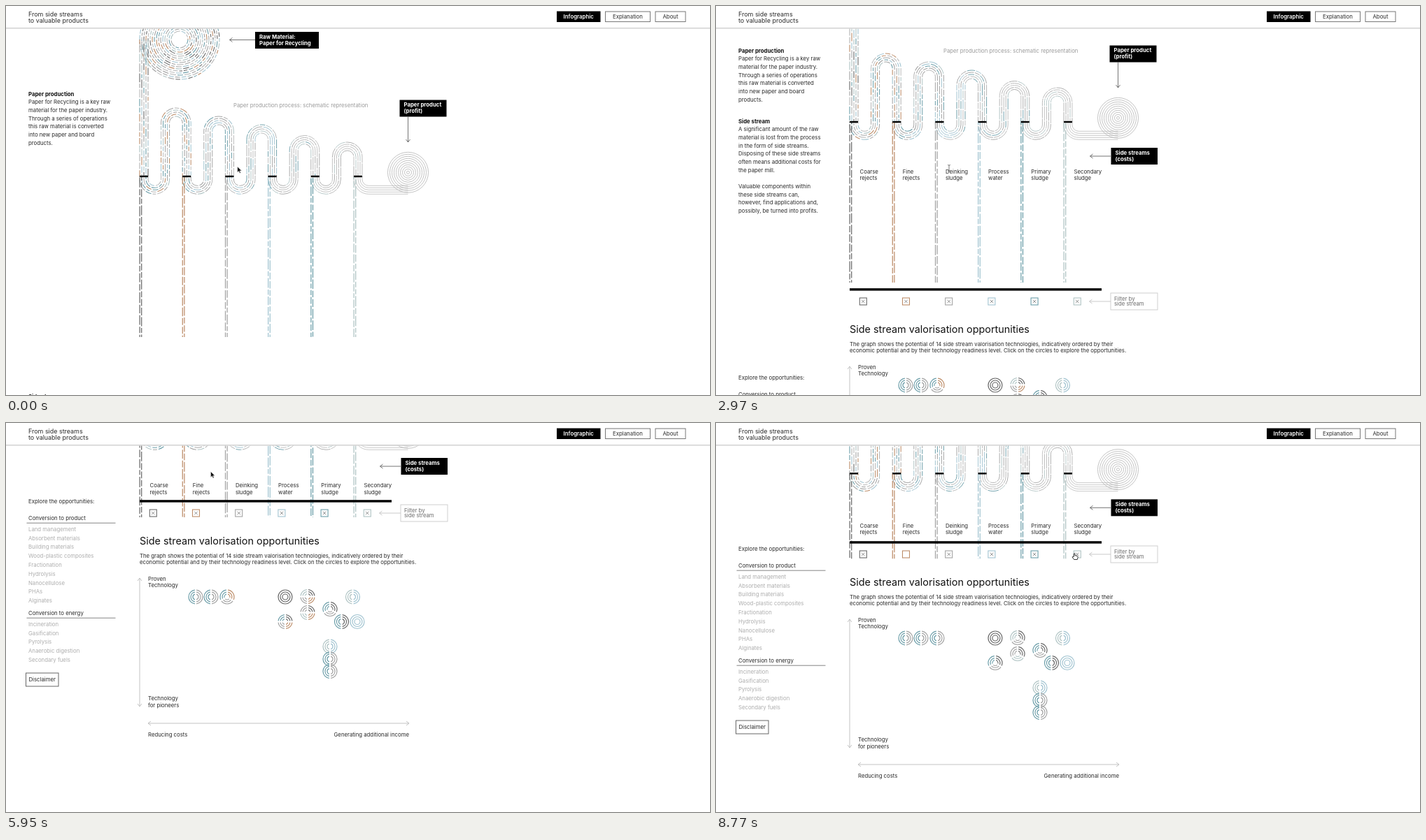
Recreate the animation shown at these times as an HTML page. Size 1006 px wide and 557 px high, loop 8870 ms.

```html
<!DOCTYPE html>
<html lang="en">
<head>
<meta charset="utf-8">
<title>Side streams</title>
<style>
  html, body { margin: 0; width: 100%; height: 100%; overflow: hidden; background: #fff; }
  svg { display: block; width: 100vw; height: 100vh; }
  text { font-family: Inter, Roboto, sans-serif; white-space: pre; }
</style>
</head>
<body>
<svg id="stage" viewBox="0 0 1006 557"></svg>
<script>
const LOOP = 8870, STEP = 148.64;
const STREAMS = ['#6a6a6a', '#bd8d69', '#a3a3a3', '#a2c4d1', '#6c9ea9', '#b0c4c4'];
const NAMES = ['Coarse rejects', 'Fine rejects', 'Deinking sludge', 'Process water', 'Primary sludge', 'Secondary sludge'];
const GAP = 61.2, FIRST = 197, BAR = 244;
const stage = document.getElementById('stage');

let seed = 7;
const rnd = () => (seed = seed * 16807 % 2147483647) / 2147483647;
const pick = list => list[Math.floor(rnd() * list.length)];

function add(parent, tag, attrs = {}) {
  const el = document.createElementNS('http://www.w3.org/2000/svg', tag);
  for (const k in attrs) el.setAttribute(k, attrs[k]);
  parent.appendChild(el);
  return el;
}
const group = (parent, attrs) => add(parent, 'g', attrs);
const rect = (parent, x, y, width, height, fill, more) => add(parent, 'rect', { x, y, width, height, fill, ...more });
const stroke = (parent, d, color, width = 1, more) =>
  add(parent, 'path', { d, fill: 'none', stroke: color, 'stroke-width': width, ...more });

// y is the middle of the capitals
function text(parent, x, y, str, more = {}) {
  const size = more['font-size'] || 7.78;
  add(parent, 'text', { x, y: y + size * 0.36, 'font-size': size, fill: '#2a2a2a', ...more }).textContent = str;
}
function lines(parent, x, y, lead, list, more) {
  list.forEach((s, i) => text(parent, x, y + i * lead, s, more));
}
const BOLD = { 'font-weight': 700, fill: '#111' };
const PALE = { fill: '#adadad' };

// A line of mixed dashes: one path per colour, all sharing the same period
const threads = [];
function dashed(parent, d, pool, len, gap, width) {
  const g = group(parent);
  const dashes = Array.from({ length: 16 }, () => ({ len: len * (0.6 + rnd() * 0.8), color: pick(pool) }));
  for (const c of new Set(dashes.map(o => o.color))) {
    const arr = [0];
    let run = 0;
    for (const o of dashes) {
      if (o.color === c) { arr.push(run.toFixed(3), o.len.toFixed(3)); run = gap; }
      else run += o.len + gap;
    }
    arr.push(run.toFixed(3));
    stroke(g, d, c, width, { 'stroke-dasharray': arr.join(' ') });
  }
  threads.push({ g, phase: rnd() * 100 });
}

function tag(parent, x, y, w, list) {
  rect(parent, x, y, w, 24, '#000');
  lines(parent, x + 6, y + 7, 9, list, { ...BOLD, fill: '#fff' });
}

// ---- production scheme ----
const scheme = group(stage);
const OFFSETS = [-6, -3, 0, 3, 6];
const TOPS = [146, 158, 170, 185.5, 195];
const GREYS = ['#a6a6a6', '#b4b4b4', '#bdbdbd'];

for (let r = 12; r <= 57; r += 3) {
  dashed(scheme, `M${248 + r} 48a${r} ${r} 0 0 1 ${-2 * r} 0a${r} ${r} 0 0 1 ${2 * r} 0`,
    [...STREAMS, ...GREYS], 7, 2, 1.1);
}
for (const d of OFFSETS) {
  dashed(scheme, `M${FIRST + d} 48V${BAR}`, [...STREAMS, ...GREYS], 9, 2, 1.1);
  TOPS.forEach((top, i) => {
    const x = FIRST + i * GAP, r = 15.3 - d, R = 15.3 + d;
    const path = `M${x + d} ${BAR}V248a${r} ${r} 0 0 0 ${2 * r} 0V${top + 21.3}a${R} ${R} 0 0 1 ${2 * R} 0V${BAR}`;
    dashed(scheme, path, [...STREAMS.slice(i + 1), ...GREYS, ...(i > 2 ? GREYS : [])], 8 + i * 2, 2 - i * 0.25, 1.05 - i * 0.04);
  });
  const x = FIRST + 5 * GAP, r = 15.3 - d;
  stroke(scheme, `M${x + d} ${BAR}V248a${r} ${r} 0 0 0 ${r} ${r}H574.5`, '#bcbcbc', 0.8);
}
for (let r = 2; r < 32; r += 3) add(scheme, 'circle', { cx: 574.5, cy: 238.3, r, fill: 'none', stroke: '#b4b4b4', 'stroke-width': 0.8 });

const clip = add(add(stage, 'clipPath', { id: 'cut' }), 'rect', { x: 180, y: 240, width: 340, height: 234 });
const drops = group(scheme, { 'clip-path': 'url(#cut)' });
STREAMS.forEach((c, i) => {
  const x = FIRST + i * GAP;
  for (const dx of [-5.9, -3.3]) dashed(drops, `M${x + dx} ${BAR}V476`, [c], 11, 2.6, 1.25);
  rect(scheme, x - 6, BAR - 1.2, 12, 2.4, '#000');
});

text(scheme, 325, 142.5, 'Paper production process: schematic representation', { fill: '#9a9a9a' });
tag(scheme, 356, 37, 91, ['Raw Material:', 'Paper for Recycling']);
stroke(scheme, 'M356 48.5H319.5m4-3l-4 3l4 3', '#666', 0.9);
tag(scheme, 562.5, 134.5, 67, ['Paper product', '(profit)']);
stroke(scheme, 'M574.5 158V195m-3-4l3 4l3-4', '#666', 0.9);
const costs = group(scheme);
tag(costs, 564.5, 281, 66.5, ['Side streams', '(costs)']);
stroke(costs, 'M564 293H534.5m4-3l-4 3l4 3', '#666', 0.9);

const labels = group(stage);
NAMES.forEach((n, i) => lines(labels, 205.5 + i * GAP, 0, 9.2, n.split(' ')));

// ---- opportunities chart ----
const chart = group(stage);
rect(chart, 191, 110.2, 360, 3.4, '#000');
const crosses = STREAMS.map((c, i) => {
  const x = 210.3 + i * GAP;
  rect(chart, x - 5, 124, 10, 10, '#fff', { stroke: c, 'stroke-width': 1.1 });
  return stroke(chart, `M${x - 2.3} 126.7l4.6 4.6m0-4.6l-4.6 4.6`, '#777', 0.8);
});
rect(chart, 564, 117, 67, 24, '#fff', { stroke: '#cfcfcf', 'stroke-width': 1 });
lines(chart, 569, 125, 7.4, ['Filter by', 'side stream'], { fill: '#6a6a6a' });
stroke(chart, 'M564 129H533.5m4-3l-4 3l4 3', '#c4c4c4', 0.9);
text(chart, 191, 168.5, 'Side stream valorisation opportunities', { 'font-size': 14.4, fill: '#111' });
lines(chart, 191, 190, 9.3, [
  'The graph shows the potential of 14 side stream valorisation technologies, indicatively ordered by their',
  'economic potential and by their technology readiness level. Click on the circles to explore the opportunities.']);
lines(chart, 203, 223.3, 9.2, ['Proven', 'Technology']);
lines(chart, 203, 394.6, 9.2, ['Technology', 'for pioneers']);
text(chart, 203, 446, 'Reducing costs');
text(chart, 576, 446, 'Generating additional income', { 'text-anchor': 'end' });
stroke(chart, 'M191 222V406m-3-4l3 4l3-4M188 226l3-4l3 4M203 430H576m-4-3l4 3l-4 3M207 427l-4 3l4 3', '#bdbdbd', 0.9);

const SPOTS = [
  [271, 249, '24'], [293, 249, '24'], [316, 249, '124'], [399, 249, '0'], [431, 248.5, '0125'],
  [495.5, 249, '35'], [431, 271.5, '0152'], [463, 266.5, '024'], [399, 284.5, '0124'],
  [479.5, 284.5, '04'], [502, 284.5, '3'], [463, 320, '35'], [463, 338, '24'], [463, 355.5, '24']];

function dial(parent, x, y, parts) {
  const n = parts.length;
  for (const r of [10, 7, 4]) {
    if (n === 1) {
      add(parent, 'circle', { cx: x, cy: y, r, fill: 'none', stroke: STREAMS[parts[0]], 'stroke-width': 1.2 });
      continue;
    }
    parts.forEach((p, i) => {
      const pad = 1.1 / r, a = -Math.PI / 2 + i * 2 * Math.PI / n + pad, b = a + 2 * Math.PI / n - 2 * pad;
      const at = q => `${x + r * Math.cos(q)} ${y + r * Math.sin(q)}`;
      stroke(parent, `M${at(a)}A${r} ${r} 0 0 1 ${at(b)}`, STREAMS[p], 1.2);
    });
  }
}
const dials = [0, 1].map(filtered => {
  const g = group(chart);
  for (const [x, y, set] of SPOTS) dial(g, x, y, [...set].filter(p => !filtered || p !== '1'));
  return g;
});

// ---- left column ----
const intro = group(stage), side = group(stage);
const LEAD = 11.65;
text(intro, 32, 0, 'Paper production', BOLD);
lines(intro, 32, LEAD, LEAD, ['Paper for Recycling is a key raw', 'material for the paper industry.',
  'Through a series of operations', 'this raw material is converted', 'into new paper and board', 'products.']);
text(side, 32, 0, 'Side stream', BOLD);
lines(side, 32, LEAD, LEAD, ['A significant amount of the raw', 'material is lost from the process',
  'in the form of side streams.', 'Disposing of these side streams', 'often means additional costs for', 'the paper mill.', '',
  'Valuable components within', 'these side streams can,', 'however, find applications and,', 'possibly, be turned into profits.']);
text(side, 32, 367, 'Explore the opportunities:');
function menu(y, title, items) {
  text(side, 32, y, title);
  stroke(side, `M29.5 ${y + 7.2}H156.5`, '#777', 0.9);
  lines(side, 32, y + 16, 12.8, items, PALE);
}
menu(391, 'Conversion to product', ['Land management', 'Absorbent materials', 'Building materials',
  'Wood-plastic composites', 'Fractionation', 'Hydrolysis', 'Nanocellulose', 'PHAs', 'Alginates']);
menu(527, 'Conversion to energy', ['Incineration', 'Gasification', 'Pyrolysis', 'Anaerobic digestion', 'Secondary fuels']);
rect(side, 28.5, 613, 46.5, 19, '#fff', { stroke: '#666', 'stroke-width': 1 });
text(side, 32.5, 622.5, 'Disclaimer');

const veil = rect(stage, 0, 31, 1006, 526, '#9d907d');

// ---- header ----
const head = group(stage);
rect(head, 0, 0, 1006, 31, '#fff');
rect(head, 0, 31, 1006, 1, '#cfcfcf');
rect(head, 0, 32, 1006, 1, '#e4e4e4', { 'fill-opacity': 0.7 });
lines(head, 32, 12, 9.2, ['From side streams', 'to valuable products'], { 'font-size': 8.94 });
function button(x, w, str, on) {
  rect(head, x + 0.5, 8, w - 1, 14.5, on ? '#000' : '#fff', { stroke: on ? '#000' : '#777', 'stroke-width': 1 });
  text(head, x + w / 2, 15.4, str, { 'text-anchor': 'middle', 'font-size': 7.85, ...(on ? { 'font-weight': 600, fill: '#fff' } : {}) });
}
button(787, 62.5, 'Infographic', true);
button(856, 65, 'Explanation');
button(927.5, 44, 'About');

// ---- pointers, drawn around their hot spot ----
const pointer = group(stage);
const arrow = add(pointer, 'path', { d: 'M0 0V8.2L2 6.4L3.3 9.4L4.7 8.8L3.4 5.9H6Z', fill: '#111', stroke: '#fff', 'stroke-width': 0.5 });
const beam = stroke(pointer, 'M-1.8 -4.5Q0 -4.5 0 -3.3Q0 -4.5 1.8 -4.5M0 -3.3V3.3M-1.8 4.5Q0 4.5 0 3.3Q0 4.5 1.8 4.5', '#555', 0.8);
const hand = add(pointer, 'path', {
  d: 'M-1.6 1V-3.4Q-0.8 -4.6 0 -3.4V-0.8L3.4 0Q4.4 0.4 4.1 1.8L3.3 5H-1.4L-4 1.4Q-3.6 0 -1.6 1Z',
  fill: '#fff', stroke: '#222', 'stroke-width': 0.9 });

// time, scheme scroll, side column, chart, labels, stream end
const SCROLL = [
  [150, 0, 559, 500, 575, 474],
  [1190, 19.5, 477, 500, 488, 474],
  [1950, 19.5, 477, 500, 488, 474],
  [2680, 78, 165, 294, 237, 474],
  [4020, 78, 165, 294, 237, 474],
  [4600, 96, -100, 134, 219.5, 366],
  [5300, 96, -100, 134, 219.5, 366],
  [5800, 231, -255, 0, 89.5, 366],
  [6050, 231, -255, 0, 89.5, 366],
  [6840, 78, -69, 152, 237, 366],
  [7250, 78, -69, 152, 237, 366],
  [8500, 171.7, -187, 59, 147, 366]];
const MOUSE = [
  [150, 330.7, 230], [1190, 329.6, 230.5], [2000, 329.6, 230.5], [2680, 333, 232], [4020, 333, 232],
  [4600, 332.5, 232.5], [5200, 332.5, 232.5], [5800, 292.5, 69.5], [6050, 292.5, 69.5],
  [6800, 269, 289], [7300, 269, 289], [8400, 513, 190.5]];
const VEIL = [[4460, 0], [4750, 0.79], [5050, 1]];

function tween(keys, t) {
  const i = keys.findIndex(k => k[0] > t);
  if (i < 0) return keys[keys.length - 1].slice(1);
  if (i === 0) return keys[0].slice(1);
  const a = keys[i - 1], b = keys[i];
  const u = (t - a[0]) / (b[0] - a[0]), e = u * u * (3 - 2 * u);
  return a.slice(1).map((v, j) => v + (b[j + 1] - v) * e);
}
const move = (el, x, y) => el.setAttribute('transform', `translate(${x.toFixed(2)} ${y.toFixed(2)})`);
const show = (el, on) => el.setAttribute('opacity', +on);

function render(time) {
  const t = Math.floor((time % LOOP + 20) / STEP) * STEP;
  const [scroll, sideY, chartY, labelY, end] = tween(SCROLL, t);
  move(scheme, 0, -scroll);
  move(side, 0, sideY);
  move(intro, 0, Math.min(126, sideY - 101));
  move(chart, 0, chartY);
  move(labels, 0, labelY);
  clip.setAttribute('height', end - 240);
  for (const { g, phase } of threads) g.setAttribute('stroke-dashoffset', (phase - t * 0.03).toFixed(2));
  show(costs, Math.max(0, Math.min(1, (t - 600) / 400)));
  show(veil, t < 5900 ? tween(VEIL, t)[0] : 0);

  const filtered = t > 7250;
  show(crosses[1], !filtered);
  show(dials[0], !filtered);
  show(dials[1], filtered);

  const [x, y] = tween(MOUSE, t);
  const onText = t > 2670 && t < 4200;
  const onBox = (t > 6750 && t < 7500) || t > 8250;
  move(pointer, x, y);
  show(beam, onText);
  show(hand, onBox);
  show(arrow, !onText && !onBox);
}

let start;
function tick(now) {
  start ??= now;
  render(now - start);
  requestAnimationFrame(tick);
}
render(0);
requestAnimationFrame(tick);
</script>
</body>
</html>
```
